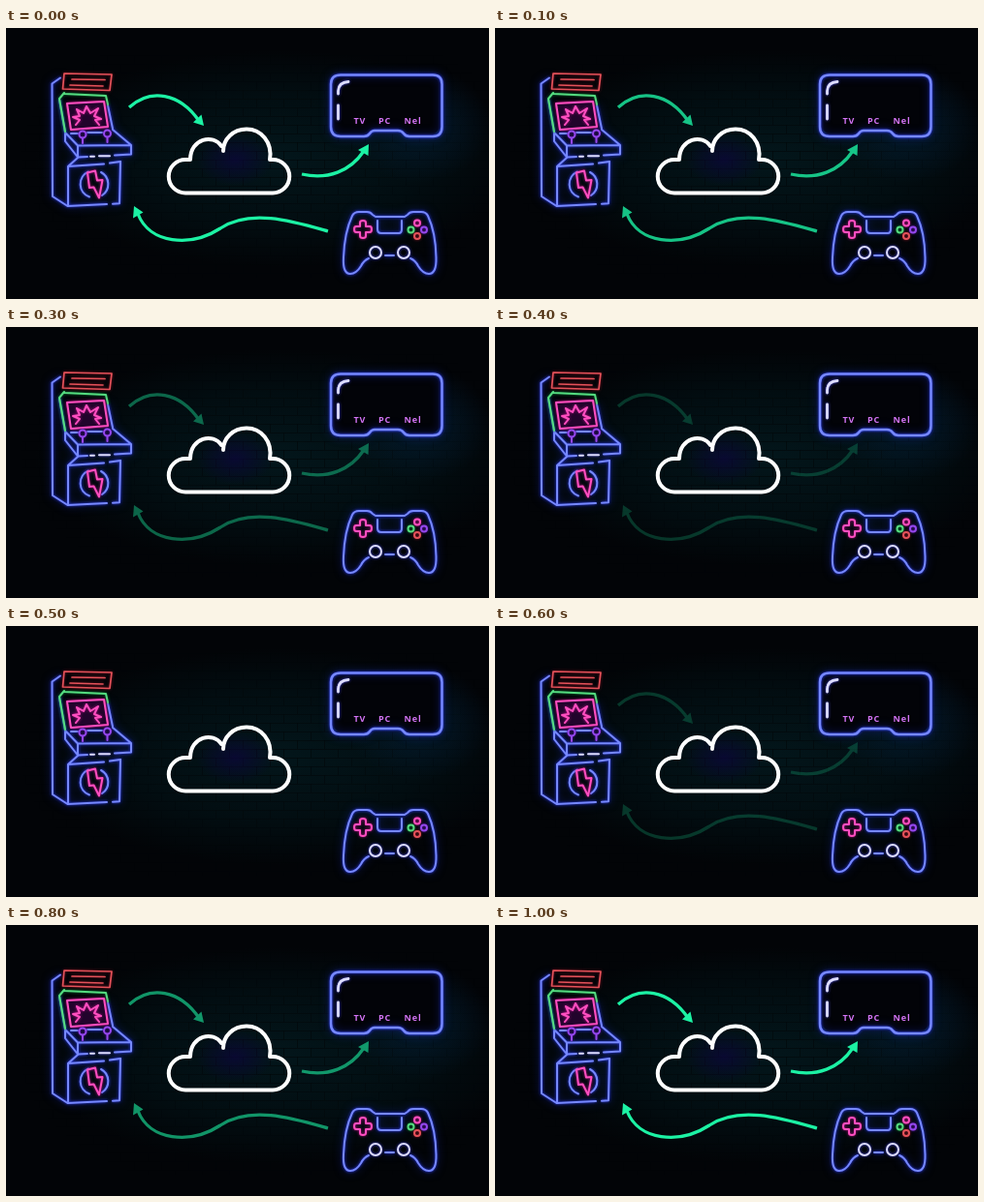
These frames come from a looping animation (498 px wide and 280 px high, 1100 ms). An HTML page:

```html
<!DOCTYPE html>
<html lang="en">
<head>
<meta charset="utf-8">
<title>Cloud gaming in neon</title>
<style>
  html, body { margin: 0; width: 100%; height: 100%; overflow: hidden; background: #020407; }
  svg { display: block; width: 498px; height: 280px; }
  .neon { fill: none; stroke-width: 2; stroke-linecap: round; stroke-linejoin: round; }
  .blue { stroke: #7688ff; filter: drop-shadow(0 0 1.5px #2a38f0) drop-shadow(0 0 4px #1a28b080); }
  .pink { stroke: #ff4fc0; filter: drop-shadow(0 0 1.5px #b01080); }
  .red { stroke: #e4525a; filter: drop-shadow(0 0 1.5px #801020); }
  .green { stroke: #55dc80; filter: drop-shadow(0 0 1.5px #087030); }
  .purple { stroke: #9548ee; filter: drop-shadow(0 0 1.5px #5510a0); }
  .pale { stroke: #dcdcff; filter: drop-shadow(0 0 1.5px #4040d0); }
  text { font: 600 9px "Noto Sans", "Open Sans", sans-serif; letter-spacing: .9px; fill: #d474f5; }
</style>
</head>
<body>
<svg viewBox="0 0 498 280">
  <defs>
    <radialGradient id="wall">
      <stop offset="0" stop-color="#03161b"/>
      <stop offset=".6" stop-color="#020d11"/>
      <stop offset="1" stop-color="#020407"/>
    </radialGradient>
    <radialGradient id="haze">
      <stop offset="0" stop-color="#0b063a" stop-opacity=".75"/>
      <stop offset="1" stop-color="#0b063a" stop-opacity="0"/>
    </radialGradient>
    <radialGradient id="spill">
      <stop offset="0" stop-color="#04203a" stop-opacity=".7"/>
      <stop offset="1" stop-color="#04203a" stop-opacity="0"/>
    </radialGradient>
    <radialGradient id="fade" cx="55%" cy="48%" r="52%">
      <stop offset="0" stop-color="#fff"/>
      <stop offset="1" stop-color="#000"/>
    </radialGradient>
    <mask id="edge"><path fill="url(#fade)" d="M0 0H498V280H0Z"/></mask>
    <pattern id="bricks" width="28" height="18" y="1" patternUnits="userSpaceOnUse">
      <path d="M0 .5H28M0 9.5H28M6.5 0V9M20.5 9V18" stroke="#010507" stroke-opacity=".6"/>
    </pattern>
  </defs>

  <path fill="#020407" d="M0 0H498V280H0Z"/>
  <ellipse cx="280" cy="135" rx="250" ry="112" fill="url(#wall)"/>
  <ellipse cx="425" cy="100" rx="75" ry="60" fill="url(#spill)"/>
  <path fill="url(#bricks)" mask="url(#edge)" d="M0 28H498V258H0Z"/>
  <ellipse cx="236" cy="136" rx="40" ry="27" fill="url(#haze)"/>
  <path fill="#020308" d="M345 49H440L449 58V102L440 111H416L404 106H380L369 111H345L335 102V58Z"/>

  <!-- arcade cabinet -->
  <g class="neon">
    <g class="blue">
      <path d="M56 51.500L47.500 57.500L48 174L63.500 184L104 182M110 181.700L117 181.300L118 138"/>
      <path d="M55 74L61 108L74 121.500L129 121L110 105M61 109V117L74 133.500L84 133M112 131.500L129 130.500V121M74 122V133"/>
      <path d="M64 184V143L74 134M64 143L101 140.500M107 139.500L118 138M105 80L110 104"/>
      <path d="M85 148.500A14 14 0 0 0 86 174.500M98 149A14 14 0 0 1 99 173"/>
      <path d="M67 109H74M84 108H99"/>
    </g>
    <path class="red" stroke-width="1.700" d="M60 47L109 48L107 64.500L58.500 63ZM68 53L102 53.500M66 59L100 60"/>
    <path class="green" d="M60 67L55 73L61 107M60 68L103 70L105 79"/>
    <path class="pink" fill="#22042c" d="M63 78L101 76L105 102L67 105Z"/>
    <path class="pink" d="M72 100L76 95L69 92L76 91L73 84L80 88L83 81L87 88L95 83L91 91L98 94L92 95L96 100"/>
    <g class="purple">
      <circle cx="79" cy="110" r="3.500"/><path d="M79 114V119"/>
      <circle cx="104.500" cy="109" r="3.500"/><path d="M104.500 113V118"/>
    </g>
    <path class="pale" d="M87 132.800H91M96 132.300H107"/>
    <path class="pink" d="M84 149.500L92 147.500L94 157.500L99.500 157L96 175.500L90.500 164.500L86 165Z"/>
  </g>

  <!-- cloud -->
  <path fill="none" stroke="#fff" stroke-width="4" stroke-linecap="round" stroke-linejoin="round"
    d="M222 122C214 109 190 114 190 136H185A17 17 0 0 0 185 170.500H275A17 17 0 0 0 275 136H272C275 118 263 104.500 248 104.500C234 104.500 224 115 224 127"/>

  <!-- headset -->
  <g class="neon">
    <path class="blue" stroke-width="2.500"
      d="M345 48.500H440Q449.500 48.500 449.500 58V102Q449.500 112 440 112H416Q412 112 410 109Q408 106 404 106H380Q377 106 375 109Q373 112 369 112H345Q335 112 335 102V58Q335 48.500 345 48.500Z"/>
    <path class="pale" stroke-width="2.800" d="M342.500 68V65Q343 56 353 55.500M342.500 80V94"/>
  </g>
  <text x="358.500" y="99">TV</text>
  <text x="384" y="99">PC</text>
  <text x="410.500" y="99">Nel</text>

  <!-- controller -->
  <g class="neon">
    <g class="blue">
      <path d="M374 238Q369 240 366 246Q361 254 355 254Q347 254 348 237Q349 211 357 194Q359 190 364 190H372Q376 190 378 193L381 195H411L414 193Q416 190 420 190H428Q433 190 435 194Q443 211 443.500 237Q444 254 436 254Q430 254 425 246Q422 240 417 238"/>
      <path d="M383 199V208Q383 212 387 212H405Q408 212 408 208V199M391 235H400"/>
    </g>
    <path class="pink" d="M365 205V201Q365 199 368 199T371 201V205H375Q377 205 377 208T375 211H371V215Q371 217 368 217T365 215V211H361Q359 211 359 208T361 205Z"/>
    <g class="pale"><circle cx="381" cy="232" r="6"/><circle cx="410" cy="232" r="6"/></g>
    <circle class="pink" cx="424" cy="201.500" r="3"/>
    <circle class="green" cx="417.500" cy="208.500" r="3"/>
    <circle class="purple" cx="431" cy="208.500" r="3"/>
    <circle class="red" cx="424" cy="215" r="3"/>
  </g>

  <g id="arrows" fill="none" stroke="#1cf2a4" stroke-width="3.300">
    <path d="M127 82C149 62 179 67 199 96M305 151C332 157 355 148 369 127M332 210C297 200 252 186 221 207C190 227 148 223 136 192"/>
    <path fill="#1cf2a4" stroke="none" d="M204 101L193 97.500L201.500 89.500ZM374 120L363 126L373.500 132ZM132 184L131 196.500L141.500 190.500Z"/>
  </g>
</svg>
<script>
  const arrows = document.getElementById("arrows");
  const STEP = 100, STEPS = 11;

  // Fade out over five held steps, then back in.
  function draw(now) {
    const step = Math.floor(now / STEP) % STEPS;
    arrows.setAttribute("opacity", Math.abs(1 - step / 5));
    requestAnimationFrame(draw);
  }
  draw(performance.now());
</script>
</body>
</html>
```
